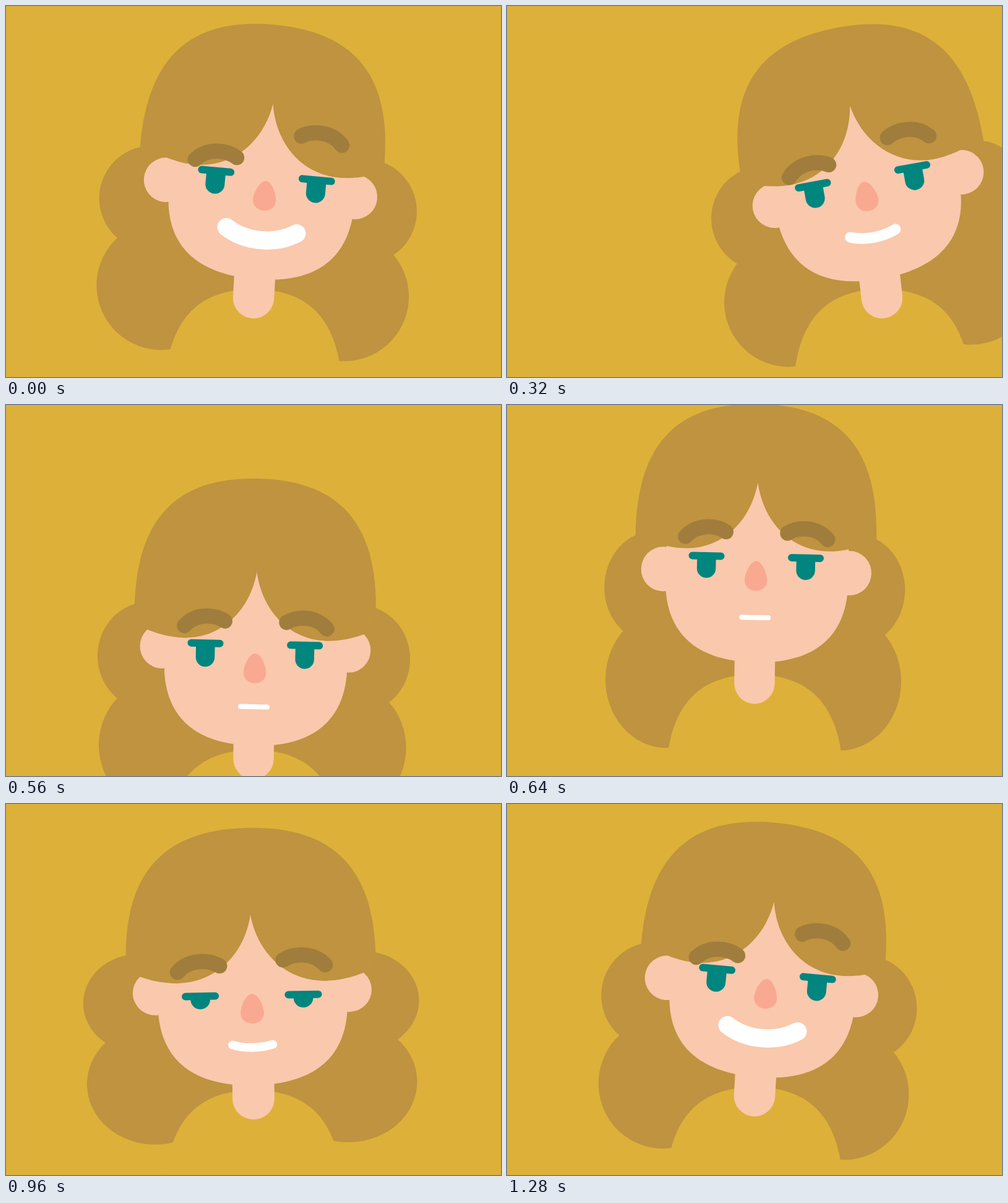
Write an HTML page with a canvas that moves like this. It is 800x600 px and loops after 1.36 s.

```html
<!DOCTYPE html>
<html lang="en">
<head>
<meta charset="utf-8">
<title>Girl</title>
<style>
  html, body { margin: 0; width: 100%; height: 100%; overflow: hidden; background: #ddb139; }
  canvas { display: block; }
</style>
</head>
<body>
<canvas id="stage" width="800" height="600"></canvas>
<script>
const ctx = document.getElementById('stage').getContext('2d');
const LOOP = 1360, STEP = 40;
const EXIT = 480, ENTER = 560;
const BG = '#ddb139', HAIR = '#bf933f', SKIN = '#fac8ac',
      NOSE = '#f9a991', EYE = '#00857f', BROW = '#a07d3c';

// Monotone cubic through [time, value] pairs, flat at both ends and at extremes.
function track(...keys) {
  const rate = i => (keys[i + 1][1] - keys[i][1]) / (keys[i + 1][0] - keys[i][0]);
  const slope = keys.map((k, i) => {
    if (i === 0 || i === keys.length - 1) return 0;
    const a = rate(i - 1), b = rate(i);
    return a * b > 0 ? 2 * a * b / (a + b) : 0;
  });
  return t => {
    if (t <= keys[0][0]) return keys[0][1];
    const i = keys.findIndex(k => k[0] >= t) - 1;
    if (i < 0) return keys[keys.length - 1][1];
    const [t0, v0] = keys[i], [t1, v1] = keys[i + 1];
    const d = t1 - t0, u = (t - t0) / d, w = 1 - u;
    return v0 * w * w * (1 + 2 * u) + v1 * u * u * (1 + 2 * w)
      + d * u * w * (slope[i] * w - slope[i + 1] * u);
  };
}

// At rest until the exit, then a pose on entering, a recoil, a rebound and rest again.
function bounce(rest, a, b, c) {
  const back = track([ENTER, a], [760, b], [960, c], [1120, rest]);
  return t => t < ENTER ? rest : back(t);
}

const pose = {
  x: track([0, 0], [160, 36.5], [320, 206], [440, 570], [EXIT, 800]),
  y: track([ENTER, 100], [600, 25], [640, -22], [760, 0], [960, 5], [1120, 0]),
  tilt: track([0, 5.2], [160, 4], [320, -10.2], [EXIT, -14], [ENTER, 1.3], [760, 1], [960, -1], [1120, 5.2]),
  faceX: track([0, 3], [160, 2.5], [320, 4], [ENTER, -1.4], [760, -1.8], [960, 0.2], [1120, 3]),
  smile: track([0, 1], [160, 1], [320, 0.43], [440, 0], [760, 0], [960, 0.28], [1120, 1]),
  raise: track([0, 1], [160, 1], [320, 0.6], [EXIT, 0], [760, 0], [960, 0.18], [1120, 1]),
  brow: track([160, -223.5], [320, -227], [ENTER, -221.5], [760, -285], [960, -216], [1120, -223.5]),
  wide: bounce(1, 0.985, 0.98, 1.02),
  top: bounce(-443, -453, -448, -438.5),
  fringe: bounce(-315, -302, -367, -298),
  eye: bounce(-199, -185, -240, -167.5),
  pupil: bounce(37, 38, 29, 21),
  nose: bounce(-166, -146, -224, -146),
  mouth: bounce(-102, -84, -147.5, -85.5),
  chin: bounce(-30.5, -21, -57.5, -22),
  ear: bounce(-177.3, -178.6, -186.5, -174),
  curlY: bounce(0, -8.7, 36.6, -15.7),
  curlW: track([0, 1], [EXIT, 1], [ENTER, 0.983], [760, 0.9], [960, 1.056], [1160, 0.982], [LOOP, 1]),
  curlH: track([0, 1], [EXIT, 1], [ENTER, 1.03], [760, 1.1], [960, 0.938], [1160, 1.03], [LOOP, 1])
};

function fill(color, path) {
  ctx.fillStyle = color;
  ctx.beginPath();
  path();
  ctx.fill();
}

function stroke(color, width, path) {
  ctx.strokeStyle = color;
  ctx.lineWidth = width;
  ctx.lineCap = 'round';
  ctx.beginPath();
  path();
  ctx.stroke();
}

function at(x, y, draw) {
  ctx.save();
  ctx.translate(x, y);
  draw();
  ctx.restore();
}

const rotate = deg => ctx.rotate(deg * Math.PI / 180);
const disc = (x, y, r) => fill(ctx.fillStyle, () => ctx.arc(x, y, r, 0, 7));
const sides = draw => [-1, 1].forEach(draw);

function curls(p) {
  at(0, 0, () => {
    rotate(p.tilt * 0.68);
    ctx.translate(-2, p.curlY);
    ctx.scale(p.curlW, p.curlH);
    fill(HAIR, () => {
      ctx.moveTo(-100, -230);
      ctx.lineTo(100, -230);
      ctx.lineTo(172, -150.6);
      ctx.lineTo(148.3, -11);
      ctx.lineTo(100, 60);
      ctx.lineTo(-100, 60);
      ctx.lineTo(-148.3, -11);
      ctx.lineTo(-172, -150.6);
    });
    sides(s => {
      disc(s * 172, -150.6, 85);
      disc(s * 148.3, -11, 104.4);
    });
  });
}

function body() {
  fill(BG, () => {
    ctx.moveTo(-142, 300);
    ctx.lineTo(-142, 128);
    ctx.bezierCurveTo(-133, 30, -85, -14, 0, -14);
    ctx.bezierCurveTo(85, -14, 133, 30, 142, 128);
    ctx.lineTo(142, 300);
  });
}

function dome(p) {
  const side = p.top + 213;
  at(-p.tilt - 1.5, 0, () => fill(HAIR, () => {
    ctx.moveTo(-198, side + 35);
    ctx.lineTo(-198, side);
    ctx.bezierCurveTo(-198, side - 130, -147, p.top, 0, p.top);
    ctx.bezierCurveTo(147, p.top, 198, side - 130, 198, side);
    ctx.lineTo(198, side + 35);
  }));
}

// Keeps the skin below the parted fringe.
function clipFringe(p) {
  const x = p.faceX, y = p.fringe;
  ctx.beginPath();
  ctx.moveTo(-400, y + 88);
  ctx.lineTo(x - 200, y + 88);
  ctx.bezierCurveTo(x - 167, y + 102, x - 145, y + 109, x - 118, y + 109);
  ctx.bezierCurveTo(x - 55, y + 109, x - 10, y + 62, x, y);
  ctx.bezierCurveTo(x + 10, y + 62, x + 55, y + 109, x + 118, y + 109);
  ctx.bezierCurveTo(x + 145, y + 109, x + 167, y + 102, x + 200, y + 88);
  ctx.lineTo(400, y + 88);
  ctx.lineTo(400, 200);
  ctx.lineTo(-400, 200);
  ctx.clip();
}

function head(p) {
  stroke(SKIN, 66.5, () => {
    ctx.moveTo(0, 0);
    ctx.lineTo(-p.tilt * 0.5, -80);
  });
  ctx.save();
  clipFringe(p);
  at(0.8 - p.tilt * 0.5, p.chin, () => fill(SKIN, () => {
    ctx.moveTo(0, 0);
    ctx.bezierCurveTo(-95, 0, -143, -42, -149.5, -115);
    ctx.bezierCurveTo(-156, -250, -135, -340, 0, -340);
    ctx.bezierCurveTo(135, -340, 156, -250, 149.5, -115);
    ctx.bezierCurveTo(143, -42, 95, 0, 0, 0);
  }));
  ctx.fillStyle = SKIN;
  sides(s => disc(s * 153.3 - p.tilt * 0.9, p.ear, 36));
  ctx.restore();
}

function brow(p, s) {
  const lift = s > 0 ? 44 * p.raise : 0;
  at(p.faceX, p.brow - lift, () => stroke(BROW, 24.5, () => {
    ctx.moveTo(s * 50.5, 0);
    ctx.bezierCurveTo(s * 66, -10, s * 98, -13, s * 117, 9);
  }));
}

function eye(p, s) {
  at(p.faceX + s * 81.6, p.eye, () => {
    fill(EYE, () => {
      ctx.moveTo(-15.5, 0);
      ctx.arc(0, p.pupil - 15.5, 15.5, Math.PI, 0, true);
      ctx.lineTo(15.5, 0);
    });
    stroke(EYE, 12, () => {
      ctx.moveTo(-23.5, 0);
      ctx.lineTo(23.5, 0);
    });
  });
}

function nose(p) {
  at(p.faceX + 0.3, p.nose, () => fill(NOSE, () => {
    ctx.moveTo(0, -24);
    ctx.bezierCurveTo(10, -24, 18.5, -3, 18.5, 7);
    ctx.bezierCurveTo(18.5, 18, 9, 24, 0, 24);
    ctx.bezierCurveTo(-9, 24, -18.5, 18, -18.5, 7);
    ctx.bezierCurveTo(-18.5, -3, -10, -24, 0, -24);
  }));
}

function mouth(p) {
  const m = p.smile, half = 22 + 35 * m, inner = half * 0.42;
  at(p.faceX, p.mouth, () => stroke('#fff', 8 + 21.5 * m, () => {
    ctx.moveTo(-half, -8 * m);
    ctx.bezierCurveTo(-inner, 13.3 * m, inner, 13.3 * m, half, -8 * m);
  }));
}

function draw(t) {
  ctx.fillStyle = BG;
  ctx.fillRect(0, 0, 800, 600);
  if (t >= EXIT && t < ENTER) return;

  const p = {};
  for (const name in pose) p[name] = pose[name](t);
  if (t < EXIT) p.y = 0;
  else p.x = 0;

  at(400 + p.x, 472 + p.y, () => {
    curls(p);
    body();
    rotate(p.tilt);
    ctx.scale(p.wide, 1);
    dome(p);
    head(p);
    sides(s => brow(p, s));
    sides(s => eye(p, s));
    nose(p);
    mouth(p);
  });
}

const start = performance.now();
function tick() {
  const t = (performance.now() - start) % LOOP;
  draw(Math.min(Math.floor(t / STEP) * STEP, 1280));
  requestAnimationFrame(tick);
}
tick();
</script>
</body>
</html>
```
